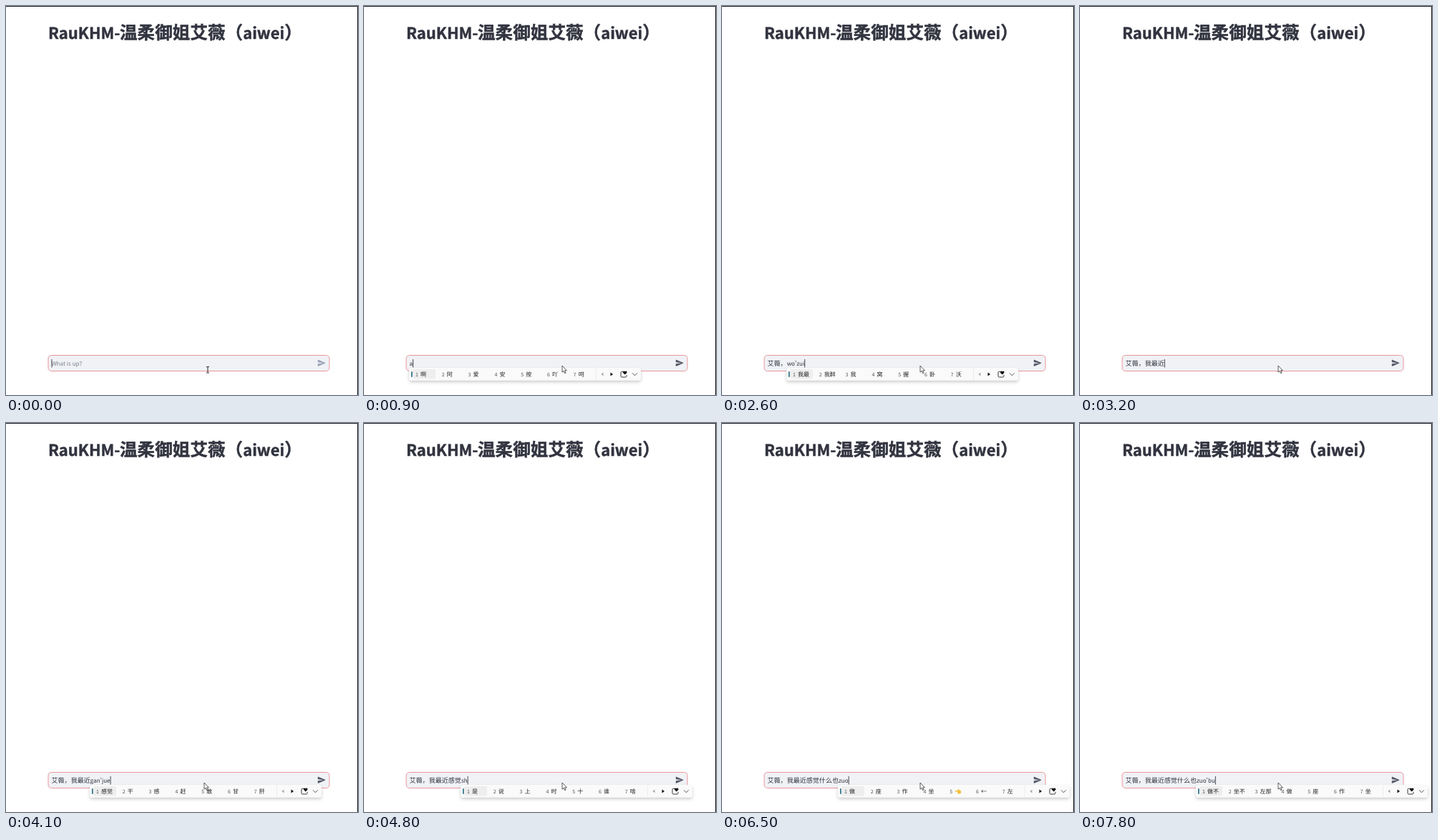
Write an HTML page that moves like this. It is 492 by 544 pixels and loops after 8000 ms.

```html
<!DOCTYPE html>
<html lang="zh-CN">
<head>
<meta charset="utf-8">
<title>Chat input</title>
<style>
  html, body { margin: 0; width: 100%; height: 100%; overflow: hidden; background: #fff; }
  svg { display: block; }
  text { font-family: "Noto Sans CJK SC", "Noto Sans CJK", "Noto Sans CJK JP", sans-serif; fill: #31333f;
         text-rendering: geometricPrecision; white-space: pre; }
  .title { font-weight: 700; font-size: 24.6px; stroke: #31333f; stroke-width: .45px; }
  .title .latin { font-size: 22px; }
  .entry { font-size: 9.05px; }
  .entry.latin { font-size: 8.1px; }
  .num { font-size: 7px; fill: #555; }
  .cand { font-size: 8px; fill: #222; }
</style>
</head>
<body>
<svg width="492" height="544" viewBox="0 0 492 544">
  <defs>
    <filter id="shadow" x="-5%" y="-40%" width="110%" height="220%">
      <feDropShadow dx="0" dy="2.5" stdDeviation="2" flood-color="#000" flood-opacity=".2"/>
    </filter>
  </defs>
  <path d="M0 .5H491.5V544" fill="none" stroke="#1c1c1e"/>
  <g class="title">
    <text class="latin" x="59" y="46">RauKHM-</text>
    <text x="159" y="46">温柔御姐艾薇（<tspan class="latin">aiwei</tspan>）</text>
  </g>

  <rect x="59" y="488.5" width="393" height="22" rx="4.5" fill="#f0f2f6" stroke="#ec969a"/>
  <path id="send" transform="translate(434.7 492.8) scale(.54)" d="M3.4 20.4l17.45-7.48c.81-.35.81-1.49 0-1.84L3.4 3.6c-.66-.29-1.39.2-1.39.91L2 9.12c0 .5.37.93.87.99L17 12 2.87 13.88c-.5.07-.87.5-.87 1l.01 4.61c0 .71.73 1.2 1.39.91z"/>
  <text id="hint" class="entry latin" x="63.5" y="502.6" style="fill:#7b7e8b">What is up?</text>
  <text id="done" class="entry" x="63.5" y="502.6"></text>
  <text id="typed" class="entry latin" y="502.6"></text>
  <rect id="caret" y="494" width="1" height="11.5" fill="#444650"/>

  <g id="popup">
    <rect id="panel" y="506" height="17.5" rx="3.5" fill="#fafafa" filter="url(#shadow)"/>
    <rect x="5" y="508" width="32" height="13.5" rx="2" fill="#eeeeee"/>
    <rect x="3" y="511" width="1.6" height="8" rx=".8" fill="#1f6b80"/>
    <g id="list"></g>
    <g id="tools">
      <path d="M261.5 506.5V523" stroke="#ececec"/>
      <path d="M271.5 512.6v4.8l-3.2-2.4z" fill="#aaa"/>
      <path d="M281.5 512.4v5.2l3.6-2.6z" fill="#111"/>
      <path d="M299 511.2h-1.5q-1.5 0-1.5 1.5v4.8q0 1.5 1.5 1.5h5q1.5 0 1.5-1.5v-1.6" fill="none" stroke="#222" stroke-width=".9"/>
      <path d="M301.7 515.6l-2.6-2.7a1.5 1.5 0 0 1 2.6-1.6 1.5 1.5 0 0 1 2.6 1.6z" fill="#111"/>
      <path d="M312 513.4l3.4 3.4 3.4-3.4" fill="none" stroke="#444" stroke-width=".9"/>
    </g>
  </g>

  <path id="beam" d="M280 504.5h1.3l.7.6.7-.6h1.3M282 505v7.5M280 513h1.3l.7-.6.7.6h1.3" fill="none" stroke="#222"/>
  <path id="arrow" d="M277 503v9.2l2.1-1.9 1.5 3.4 1.5-.7-1.5-3.2h2.8z" fill="#fff" stroke="#333" stroke-width=".8"/>
</svg>
<script>
const $ = id => document.getElementById(id);
const LOOP = 8000, LEFT = 63.5, EM = 9.05, PITCH = 36.8;
const message = "艾薇，我最近感觉什么也";

// time, committed characters, letters being composed, candidates
const steps = [
  [0, 0],
  [800, 0, "a", "啊 阿 爱 安 按 吖 呵"],
  [1100, 0, "ai'w", "爱玩 爱我 艾 爱 哎 唉 挨"],
  [1200, 0, "ai'wei", "艾薇 艾维 爱为 爱 哎 唉 艾"],
  [1700, 2],
  [2000, 3],
  [2200, 3, "w", "我 为 无 问 玩 外 晚"],
  [2300, 3, "wo", "我 窝 握 卧 沃 喔 蜗"],
  [2500, 3, "wo'z", "我在 我自 我 窝 握 卧 沃"],
  [2600, 3, "wo'zui", "我最 我醉 我 窝 握 卧 沃"],
  [2700, 3, "wo'zui'j", "我最 我醉 我 窝 握 卧 沃"],
  [3000, 6],
  [3400, 6, "g", "个 给 过 更 高 该 刚"],
  [3600, 6, "ga", "嘎 噶 尬 尕 伽 旮 钆"],
  [4100, 6, "gan'jue", "感觉 干 感 赶 敢 甘 肝"],
  [4400, 8],
  [4800, 8, "sh", "是 说 上 时 十 谁 啥"],
  [4900, 8, "shen", "什 深 身 神 甚 审 伸"],
  [5000, 8, "shen'me", "什么 神 深 身 什 甚 审"],
  [5200, 10],
  [5300, 10, "y", "有 一 要 也 与 用 以"],
  [5400, 10, "yw", "因为 以为 意外 业务 英文 遗忘 一万多"],
  [5700, 10, "y", "有 一 要 也 与 用 以"],
  [5800, 10, "ye", "也 夜 爷 业 叶 页 也许是"],
  [6000, 11],
  [6300, 11, "z", "在 这 做 子 自 再 走"],
  [6400, 11, "zu", "组 足 族 租 祖 阻 卒"],
  [6500, 11, "zuo", "做 座 作 坐 👈 ← 左"],
  [6900, 11, "zuo'b", "做不 作吧 坐吧 做 座 作 坐"],
  [7300, 11, "zuo", "做 座 作 坐 👈 ← 左"],
  [7600, 11, "zuo'b", "做不 作吧 坐吧 做 座 作 坐"],
  [7800, 11, "zuo'bu", "做不 坐不 左部 做 座 作 坐"]
];

const show = (id, on) => $(id).style.display = on ? "" : "none";

function candidate(word, i) {
  const x = 9 + i * PITCH;
  const body = word === "👈"
    ? `<path transform="translate(${x + 7.2} 510.8)" d="M.8 3.1h3.2L4.7 1q1.5.2 1.3 1.8h.8q1.8 0 1.8 1.8v1q0 2-2 2H4.8Q3.5 7.4 3.8 4.8H.8q-.9-.9 0-1.7z" fill="#f3bd35"/>`
    : `<text class="cand" x="${x + 7}" y="518">${word}</text>`;
  return `<text class="num" x="${x}" y="517.6">${i + 1}</text>${body}`;
}

function apply([, count, letters = "", words = ""]) {
  const x = LEFT + count * EM, list = words ? words.split(" ") : [];
  const empty = !count && !letters;
  $("done").textContent = message.slice(0, count);
  $("typed").textContent = letters;
  $("typed").setAttribute("x", x);
  const end = x + (letters ? $("typed").getComputedTextLength() : 0);
  $("caret").setAttribute("x", end);
  show("hint", empty);
  show("beam", empty);
  show("arrow", !empty);
  $("send").setAttribute("fill", empty ? "#9ca4b8" : "#555866");

  show("popup", list.length);
  const extra = list.some(w => w.length > 2) ? 12 : 0;
  $("popup").setAttribute("transform", `translate(${Math.round(x - .6)} 0)`);
  $("panel").setAttribute("width", 324 + extra);
  $("tools").setAttribute("transform", `translate(${extra} 0)`);
  $("list").innerHTML = list.map(candidate).join("");
}

let current;
function draw(now) {
  const t = now % LOOP;
  const step = steps.findLast(s => s[0] <= t);
  if (step !== current) apply(current = step);
  show("caret", t < 500 || t >= 800);
  requestAnimationFrame(draw);
}
draw(0);
</script>
</body>
</html>
```
